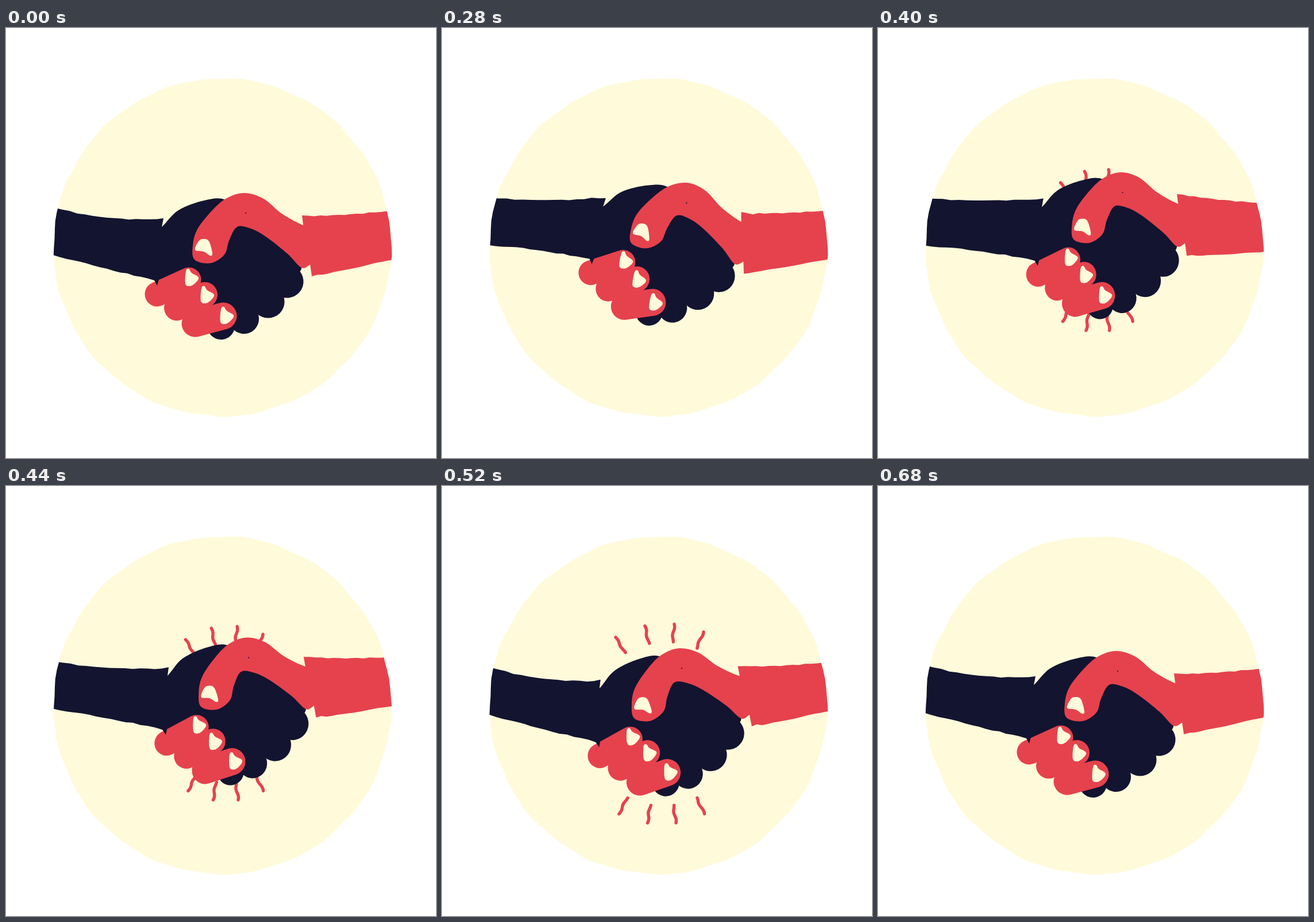
An HTML page with a canvas that plays this animation: 748x748 px, repeating every 1.36 s.

```html
<!DOCTYPE html>
<html lang="en">
<head>
<meta charset="utf-8">
<title>Handshake</title>
<style>
  html, body { margin: 0; width: 100%; height: 100%; overflow: hidden; background: #fff; }
  canvas { display: block; }
</style>
</head>
<body>
<canvas id="stage" width="748" height="748"></canvas>
<script>
const ctx = document.getElementById('stage').getContext('2d');
const LOOP = 1360, STEP = 40, START = 240, END = 680;
const CREAM = '#fffada', NAVY = '#131430', RED = '#e5424d';
const PIVOT = [417, 322];

// time, shift right, lift, clockwise tilt in degrees
const KEYS = [
  [200, 0, 0, 0], [240, 4, 8, 3.8], [320, 11.5, 26.5, 8.1], [400, 8.5, 36, -0.6],
  [440, 5, 23.5, -3.1], [520, 0, 5, -4.35], [680, 0, 0, 0]
];

const clamp = (v, lo, hi) => Math.min(hi, Math.max(lo, v));
const mix = (a, b, s) => a + (b - a) * s;

// Smooth curve through the keys, at rest on both ends.
function poseAt(t) {
  const last = KEYS.length - 1;
  if (t < START || t >= END) return [0, 0, 0];
  let i = 0;
  while (t >= KEYS[i + 1][0]) i++;
  const a = KEYS[i], b = KEYS[i + 1], span = b[0] - a[0], s = (t - a[0]) / span, r = 1 - s;
  const slope = (k, j) => k === 0 || k === last ? 0
    : (KEYS[k + 1][j] - KEYS[k - 1][j]) / (KEYS[k + 1][0] - KEYS[k - 1][0]);
  return [1, 2, 3].map(j => a[j] * (1 + 2 * s) * r * r + b[j] * s * s * (3 - 2 * s)
    + span * s * r * (slope(i, j) * r - slope(i + 1, j) * s));
}

// The hands turn about the pivot and narrow slightly as they rise.
function handMatrix(t) {
  const [shift, lift, tilt] = poseAt(t);
  const a = tilt * Math.PI / 180, squash = 1 - lift / 1000, [px, py] = PIVOT;
  return new DOMMatrix()
    .translate(px + shift, py - lift)
    .scale(squash, 1)
    .multiply(new DOMMatrix([Math.cos(a), Math.sin(a), -Math.sin(a), Math.cos(a), 0, 0]))
    .translate(-px, -py);
}

function offset(m, x, y) {
  const p = m.transformPoint(new DOMPoint(x, y));
  return [p.x - x, p.y - y];
}

function seeded(seed) {
  return () => (seed = seed * 16807 % 2147483647) / 2147483647;
}

// Closed spline through points given as a flat list.
function blob(pts, color, ox = 0, oy = 0) {
  const n = pts.length / 2;
  const at = i => {
    const k = (i + n) % n * 2;
    return [pts[k] + ox, pts[k + 1] + oy];
  };
  ctx.beginPath();
  ctx.moveTo(...at(0));
  for (let i = 0; i < n; i++) {
    const [a, b, c, d] = [i - 1, i, i + 1, i + 2].map(at);
    ctx.bezierCurveTo(b[0] + (c[0] - a[0]) / 6, b[1] + (c[1] - a[1]) / 6,
      c[0] - (d[0] - b[0]) / 6, c[1] - (d[1] - b[1]) / 6, ...c);
  }
  ctx.fillStyle = color;
  ctx.fill();
}

function finger(x1, y1, x2, y2, width, color) {
  ctx.beginPath();
  ctx.moveTo(x1, y1);
  ctx.lineTo(x2, y2);
  ctx.lineCap = 'round';
  ctx.lineWidth = width;
  ctx.strokeStyle = color;
  ctx.stroke();
}

// Quadratic edge with a slightly rough cut.
function roughEdge([x0, y0], [cx, cy], [x1, y1], seed) {
  const rand = seeded(seed), n = 16;
  return Array.from({ length: n + 1 }, (_, i) => {
    const s = i / n, r = 1 - s, cut = i < n ? (rand() - 0.5) * 2 : 0;
    return [r * r * x0 + 2 * r * s * cx + s * s * x1, r * r * y0 + 2 * r * s * cy + s * s * y1 + cut];
  });
}

const navyArm = {
  color: NAVY, rim: 85, cuff: 270, follow: 0.48, lag: 0, bow: 1,
  pts: [
    ...roughEdge([70, 309], [180, 340], [274, 331], 11),
    [271, 346], [276, 400], [263, 448],
    ...roughEdge([70, 393], [164, 416], [258, 439], 23).reverse()
  ]
};
const redArm = {
  color: RED, rim: 667, cuff: 523, follow: 0.55, lag: 40, bow: 0,
  pts: [
    ...roughEdge([684, 314], [600, 329], [515, 326], 37),
    [517, 343], [529, 411],
    ...roughEdge([684, 400], [608, 418], [532, 432], 51).reverse()
  ]
};

// The cuff moves with the hand; the rim follows less, and maybe later.
function drawArm({ color, rim, cuff, follow, lag, bow, pts }, t) {
  const now = handMatrix(t), late = handMatrix(t - lag);
  ctx.beginPath();
  for (const [x, y] of pts) {
    const u = clamp((x - rim) / (cuff - rim), 0, 1), w = mix(u, u * (2 - u), bow);
    const x0 = Math.abs(x - cuff) < 20 ? x : cuff;
    const [dx, dy] = offset(now, x0, y);
    ctx.lineTo(x + dx * u, y + mix(offset(late, x0, y)[1] * follow, dy, w));
  }
  ctx.fillStyle = color;
  ctx.fill();
}

const palm = [245,365, 271,346, 300,317, 345,300, 382,299, 420,330, 500,385, 514,418,
  490,441, 456,477, 414,506, 374,518, 300,470, 261,441, 250,420];
const thumb = [328,403, 325,378, 333,350, 358,318, 384,296, 415,287, 448,297, 480,323, 517,343,
  548,350, 548,402, 530,411, 514,417, 490,393, 452,363, 426,349, 402,346, 388,370, 380,394, 356,409];
const thumbNail = [329,386, 335,371, 343,367, 353,371, 359,392, 355,396, 344,389];
const nail = [-10,-11, -5,-15, 0,-8, 12,0, 6,10, -3,15, -11,11];

function drawNavyHand() {
  blob(palm, NAVY);
  finger(470, 425, 489, 441, 57, NAVY);
  finger(435, 455, 456, 476, 57, NAVY);
  finger(395, 480, 414, 506, 52, NAVY);
  finger(360, 495, 374, 518, 48, NAVY);
}

function drawRedHand() {
  blob(thumb, RED);
  finger(263, 463, 318, 438, 43, RED);
  finger(297, 487, 346, 464, 44, RED);
  finger(329, 514, 378, 501, 47, RED);
  blob(thumbNail, CREAM);
  blob(nail, CREAM, 323, 434);
  blob(nail, CREAM, 350, 464);
  blob(nail, CREAM, 384, 500);
  finger(...PIVOT, ...PIVOT, 2.2, NAVY);
}

// Two fans of four wavy strokes; y is the crest of the fan when it is fully out.
const FANS = [
  { dir: -1, mid: 388, first: 302, gap: 51, y: 239.5, speed: 0.05 },
  { dir: 1, mid: 382, first: 308, gap: 49.5, y: 588, speed: 0.5 }
];

function drawRays(t) {
  if (t < 320 || t >= END) return;
  const age = t - 520, gone = clamp(age / 120, 0, 1);
  const len = 31 * (1 - 0.72 * gone * gone);
  ctx.strokeStyle = RED;
  ctx.lineWidth = 5.4;
  ctx.lineCap = ctx.lineJoin = 'round';
  for (const { dir, mid, first, gap, y, speed } of FANS) {
    const rise = age * (age < 0 ? speed : 0.29);
    for (let i = 0; i < 4; i++) {
      const side = first + i * gap - mid;
      const tipX = mid + side * (1 + 0.0015 * age);
      const tipY = y + dir * (rise - 0.0032 * side * side);
      const lean = Math.asin(side * 0.006);
      ctx.beginPath();
      for (let s = 0; s <= 1; s += 0.125) {
        const wave = 1.3 * Math.sin(s * 2.5 * Math.PI) * len / 31;
        ctx.lineTo(tipX - Math.sin(lean) * len * s + wave, tipY - dir * Math.cos(lean) * len * s);
      }
      ctx.stroke();
    }
  }
}

const disc = new Path2D();
for (let i = 0; i < 120; i++) {
  const a = i * Math.PI / 60;
  const r = 293.8 + 0.9 * Math.sin(13 * a + 1) + 0.6 * Math.sin(29 * a);
  disc.lineTo(376.4 + r * Math.cos(a), 381.5 + r * Math.sin(a));
}
disc.closePath();

function withHand(m, paint) {
  ctx.save();
  ctx.transform(m.a, m.b, m.c, m.d, m.e, m.f);
  paint();
  ctx.restore();
}

function draw(time) {
  const t = Math.floor(time % LOOP / STEP) * STEP, m = handMatrix(t);
  ctx.fillStyle = '#fff';
  ctx.fillRect(0, 0, 748, 748);
  ctx.fillStyle = CREAM;
  ctx.fill(disc);
  ctx.save();
  ctx.clip(disc);
  drawRays(t);
  withHand(m, drawNavyHand);
  drawArm(redArm, t);
  withHand(m, drawRedHand);
  drawArm(navyArm, t);
  ctx.restore();
}

let start;
function tick() {
  const now = performance.now();
  start ??= now;
  draw(now - start);
  requestAnimationFrame(tick);
}
tick();
</script>
</body>
</html>
```
